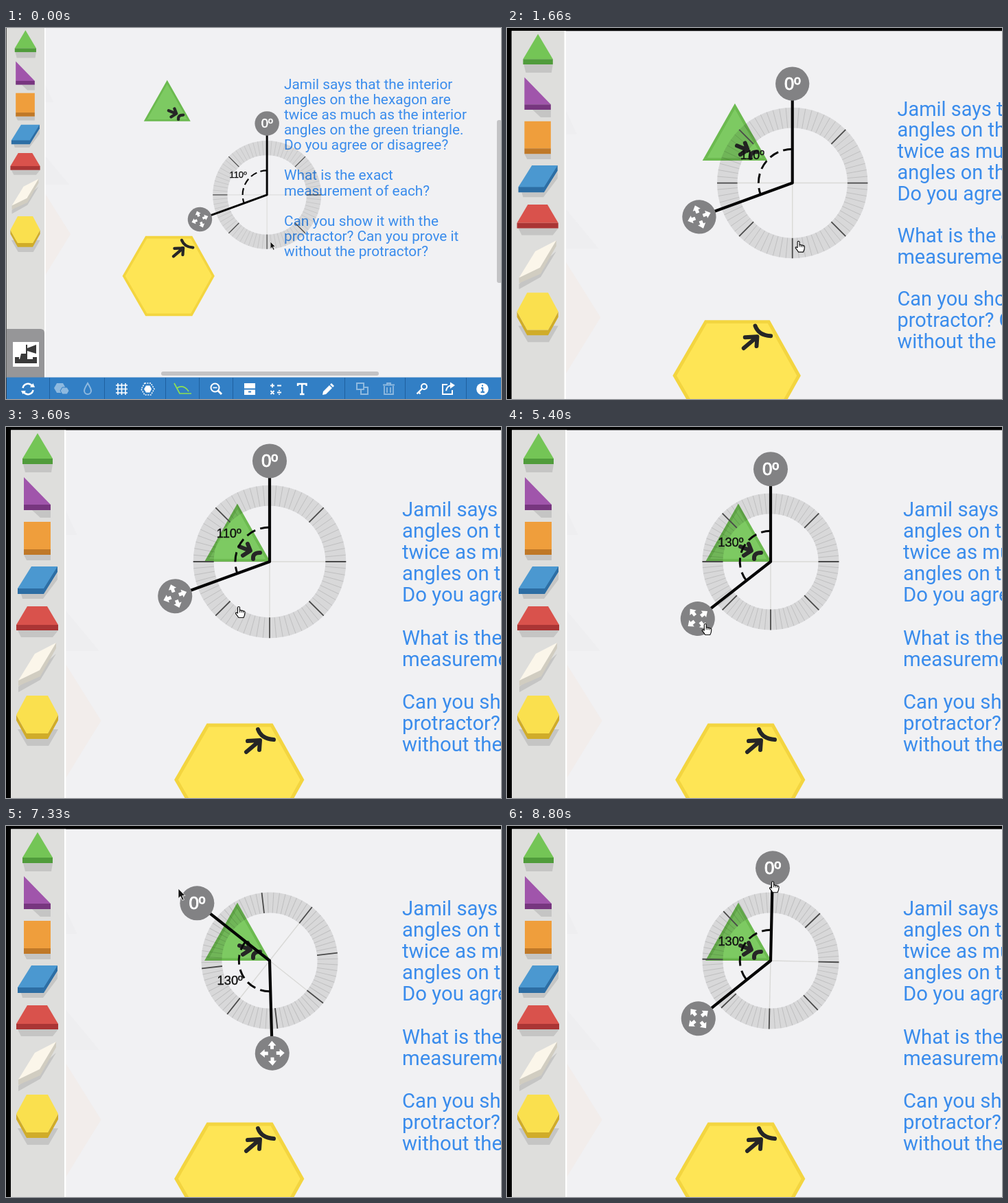
An HTML page that plays this animation: 721x540 px, repeating every 9200 ms.

```html
<!DOCTYPE html>
<html lang="en">
<head>
<meta charset="utf-8">
<title>Protractor on pattern shapes</title>
<style>
  html, body { margin: 0; width: 100%; height: 100%; overflow: hidden; background: #000; }
  svg { display: block; width: 721px; height: 540px; }
  .question { font: 400 20.8px Roboto, sans-serif; fill: #3a8cec; }
  .num { font-family: "Liberation Sans", Arial, sans-serif; text-anchor: middle; }
  .ink { fill: none; stroke: #262626; stroke-width: 6; stroke-linecap: round; stroke-linejoin: round; }
  .icon { fill: none; stroke: #fff; stroke-width: 2; }
  .solid { fill: #fff; stroke: none; }
  .dim { opacity: .45; }
  .shade { fill: #c5c5c4; }
</style>
</head>
<body>
<svg viewBox="0 0 721 540">
  <defs>
    <path id="moveArrow" d="M0 -18L6 -11H2.5V-6H-2.5V-11H-6Z"/>
  </defs>
  <g id="view">
    <rect x=".8" width="760" height="540" fill="#f1f1f3"/>

    <!-- faint ghosts beside the palette -->
    <path d="M57 241L94 300L57 360Z" fill="#f2edeb"/>
    <path d="M57 82L69 108H57ZM57 186L92 228H57Z" fill="#eeeef0"/>

    <g class="board">
      <path d="M294 434H387L431.500 513.500L387 593H294L248 513.500Z" fill="#fee555" stroke="#f3d540" stroke-width="5"/>
      <path d="M337 115.500L381.500 194H292.500Z" fill="#7dca62" stroke="#6cba50" stroke-width="4"/>
      <path class="ink" d="M340 174L355 180M352 170L356 180L345 187M360 192Q359 183 370 183"/>
      <path class="ink" d="M350 473L369 457M352 457L370 456L369 470M367 440Q372 454 390 455"/>
    </g>

    <g class="question" id="question"></g>

    <rect x="226" y="500" width="317" height="6" rx="3" fill="#c3c3c5"/>
    <rect x="715" y="134" width="7" height="237" rx="3" fill="#c3c3c5"/>

    <!-- palette -->
    <rect x=".8" width="55.500" height="509" fill="#dededc"/>
    <rect x="56" width="1.700" height="509" fill="#fff"/>
    <g class="board">
      <g class="shade">
        <path d="M25 54H68L66 66H28ZM38 121H65V132H50ZM26 186H65V194H30ZM22 243H55L75 212V222L54 250H24ZM17 296H76L68 306H22ZM73 330L50 368L18 386V378ZM17 440H76L62 464H31Z"/>
      </g>
      <path d="M46 9L68 46H24Z" fill="#74c556"/><path d="M24 46H68V54H24Z" fill="#509c3b"/>
      <path d="M26 73L65 113H26Z" fill="#a055ab"/><path d="M26 113H65V121H26Z" fill="#77367f"/>
      <path d="M26 138H65V178H26Z" fill="#ef9e3c"/><path d="M26 178H65V186H26Z" fill="#bf7828"/>
      <path d="M75 203V211L55 243H17V235Z" fill="#2d6ea4"/><path d="M37 203H75L55 235H17Z" fill="#4b98d0"/>
      <path d="M31 261H60L76 288H15Z" fill="#d9524c"/><path d="M15 288H76V296H15Z" fill="#aa3535"/>
      <path d="M73 314V322L50 363L18 377V369Z" fill="#d1cdc1"/><path d="M73 314L42 330L18 369L49 354Z" fill="#fbf6ea"/>
      <path d="M15 419L30 446H61L76 419V427L61 454H30L15 427Z" fill="#d0ac29"/>
      <path d="M30 391H61L76 419L61 446H30L15 419Z" fill="#fae04e"/>
    </g>
    <path d="M.8 438H50Q56 438 56 444V509H.8Z" fill="#969698"/>
    <rect x="10" y="457" width="38" height="36" fill="#fff"/>
    <path d="M13 479H19V482H39V479H45V488H13ZM29 461H31V482H29ZM31 466L44 461V474L31 470ZM22 474H29V482H20Z" fill="#3a3a3a"/>

    <!-- toolbar -->
    <rect x=".8" y="508.500" width="721" height="32" fill="#327fc5"/>
    <path d="M63.500 509V540M143.500 509V540M232.500 509V540M281.500 509V540M330.500 509V540M493.500 509V540M581.500 509V540M670.500 509V540" stroke="#1f609f"/>
    <g class="icon">
      <path d="M24.500 524A7.500 7.500 0 0 1 38 521M39.500 527A7.500 7.500 0 0 1 26 530" stroke-width="2.500"/>
      <path class="solid" d="M35 523H42L39.500 517ZM22 528H29L24.500 533Z"/>
      <g class="dim">
        <path class="solid" d="M74 517H83L87 524L83 531H74L70 524Z"/>
        <path d="M82 523H89L92 528L89 533H82L79 528Z" fill="#fff" stroke="#327fc5" stroke-width="1"/>
        <path d="M119 517Q124 525 124 528A5 5 0 0 1 114 528Q114 525 119 517Z"/>
        <path d="M511 517H521V526H511ZM517 526V533H527V523H521"/>
        <path d="M551 521V533H564V521M549 519.500H566M555 519V517H560V519M555 523V531M560 523V531" stroke-width="1.800"/>
      </g>
      <path d="M163 517V534M168.500 517V534M174 517V534M160 520H177M160 525.500H177M160 531H177" stroke-width="1.600"/>
      <path d="M202 517H211L216 525.500L211 534H202L197 525.500Z" stroke-width="1.500" stroke-dasharray="2 1.500"/>
      <path class="solid" d="M204 520.500H209.500L212 525.500L209.500 530.500H204L201 525.500Z"/>
      <path d="M245 517L253 532H270M249 524Q259 518 266 529" stroke="#8fe052" stroke-width="1.700"/>
      <circle cx="304.500" cy="523.500" r="6"/><path d="M309 528L314 533" stroke-width="3"/><path d="M301.500 523.500H307.500" stroke-width="1.600"/>
      <path class="solid" d="M347 517H363V534H347Z"/><path d="M347 525.500H363M353 529.500H357" stroke="#327fc5" stroke-width="1.800"/>
      <path d="M385 520.500H391M388 517.500V523.500M395 520.500H401M385.500 528L390.500 533M390.500 528L385.500 533M395 530.500H401M398 527V528.500M398 532.500V534" stroke-width="1.800"/>
      <path d="M425 521V518H437.500V521M431.200 518V533M428 533H434.500" stroke-width="2.400"/>
      <path class="solid" d="M461 534L462 529L471 520L475 524L466 533ZM472 519L474 517L478 521L476 523Z"/>
      <circle cx="609" cy="522" r="4"/><path d="M606 525L598.500 532.500M601 530L603.500 532.500" stroke-width="2.400"/>
      <path d="M643 519H636V533H650V527"/><path d="M641 528Q642 521 649 520"/><path class="solid" d="M647 515.500L654 520L647 525Z"/>
      <circle class="solid" cx="694" cy="525.500" r="8.800"/>
      <path d="M694 519.500V521.500M692 524H694.300V530M691.500 530H697" stroke="#327fc5"/>
    </g>

    <g class="board">
      <g id="dial">
        <circle id="ring" fill="none" stroke="#000" stroke-opacity=".105" stroke-width="30"/>
        <path id="fine" stroke="#000" stroke-opacity=".12"/>
        <path id="cross" stroke="#4c4c30" stroke-opacity=".14" stroke-width="1.400"/>
        <path id="major" stroke="#4a4a4a" stroke-width="1.800"/>
        <path id="arc" fill="none" stroke="#0a0a0a" stroke-width="3" stroke-dasharray="14 7.500"/>
        <path id="arms" fill="none" stroke="#050505" stroke-width="4.200" stroke-linejoin="round"/>
      </g>
      <text id="label" class="num" font-size="18.300" fill="#111" stroke="#111" stroke-width=".4"></text>
      <g id="zero">
        <circle r="25" fill="#828284"/>
        <text class="num" y="9" font-size="26" fill="#fff" stroke="#fff" stroke-width=".9">0º</text>
      </g>
      <g id="grip" fill="#fff">
        <circle r="25" fill="#828284"/>
        <use href="#moveArrow"/>
        <use href="#moveArrow" transform="rotate(90)"/>
        <use href="#moveArrow" transform="rotate(180)"/>
        <use href="#moveArrow" transform="rotate(270)"/>
      </g>
      <path id="arrow" d="M0 0V14.500L3.300 11.500L6 17.300L8.400 16.200L5.800 10.600L10 10.300Z" fill="#111" stroke="#fff" stroke-width=".9"/>
      <g id="hand" stroke="#111" stroke-width="1.200" stroke-linejoin="round">
        <path d="M-1.500 9V1Q-1.500 -.5 0 -.5T1.500 1V5Q3 4 4 5.500Q5.500 4.700 6.500 6Q9 5.500 9 8Q9 12 7 15.500H0Q-2 12.500 -4.500 9.500Q-4.500 7 -1.500 9Z" fill="#fff"/>
        <path d="M1.500 5V8M4 5.500V8.300M6.500 6V8.500" fill="none" stroke-width=".9"/>
      </g>
    </g>
  </g>
</svg>
<script>
const LOOP = 9200, STEP = 1000 / 15, ZOOM = 1.41;
const $ = id => document.getElementById(id);
const set = (id, name, value) => $(id).setAttribute(name, value);
const place = (id, [x, y], turn = 0) => set(id, 'transform', `translate(${x} ${y}) rotate(${turn})`);

// The board is laid out at full zoom.
document.querySelectorAll('.board').forEach(g =>
  g.setAttribute('transform', `scale(${1 / ZOOM}) translate(-6 -4.5)`));

const lines = ['Jamil says that the interior', 'angles on the hexagon are', 'twice as much as the interior',
  'angles on the green triangle.', 'Do you agree or disagree?', '', 'What is the exact',
  'measurement of each?', '', 'Can you show it with the', 'protractor? Can you prove it', 'without the protractor?'];
$('question').innerHTML = lines.map((s, i) => `<text x="405" y="${88.8 + i * 22.1}">${s}</text>`).join('');

// Rows are [time, ...values], joined by straight segments.
const centre = [[1000, 542, 347], [1333, 471.3, 290.3], [1600, 428, 236], [1933, 398, 201], [2133, 386, 190],
  [2200, 382, 187], [2400, 382, 187], [2600, 381, 190], [2866, 381, 190], [3000, 381, 193],
  [3133, 381, 193], [3333, 384, 196]];
const opening = [[4600, 110, 111.3], [4933, 165, 100], [5066, 180, 99.5], [5200, 162, 99], [5400, 128, 99.5],
  [5533, 112, 107], [5733, 130, 106], [6000, 180, 104], [6133, 180, 104], [6400, 145, 101], [6600, 130, 99.5]];
const toGrip = [[3466, 393, 282], [3533, 368, 274], [3600, 339, 262], [3733, 290, 252], [4000, 259, 249],
  [4266, 259, 249], [4466, 257, 254]];
const toZero = [[6600, 292, 291], [7066, 384, 81], [7333, 251, 91], [7400, 238, 95], [7600, 262, 114], [7800, 278, 132]];

function sample(rows, t) {
  if (t <= rows[0][0]) return rows[0].slice(1);
  const i = rows.findIndex(r => r[0] > t);
  if (i < 0) return rows[rows.length - 1].slice(1);
  const a = rows[i - 1], b = rows[i], u = (t - a[0]) / (b[0] - a[0]);
  return a.slice(1).map((v, j) => v + (b[j + 1] - v) * u);
}
const ramp = (t, a, b) => Math.min(1, Math.max(0, (t - a) / (b - a)));
const smooth = u => u * u * (3 - 2 * u);

// Degrees run anticlockwise from the top.
function polar(r, deg) {
  const a = deg * Math.PI / 180;
  return [-r * Math.sin(a), -r * Math.cos(a)];
}
const add = (p, q) => [p[0] + q[0], p[1] + q[1]];
const spoke = (r1, r2, deg) => `M${polar(r1, deg)}L${polar(r2, deg)}`;
function spokes(r1, r2, step, skip) {
  let d = '';
  for (let a = 0; a < 360; a += step) if (!skip || a % skip) d += spoke(r1, r2, a);
  return d;
}

function pointer(t, mid, grip, zero) {
  if (t < 200) return add([549, 443], [0, -8 * ramp(t, 0, 200)]);
  if (t < 3466) return add(mid, [9, 86.5]);
  if (t < 4466) return sample(toGrip, t);
  if (t < 6600) return add(grip, [11, 8]);
  if (t < 7800) return sample(toZero, t);
  return add(zero, [0, 20]);
}

function draw(t) {
  const z = 1 + (ZOOM - 1) * (1 - Math.pow(1 - ramp(t, 1000, 1933), 2.4));
  set('view', 'transform', `translate(${14.6 * (z - 1)} ${11 * (z - 1)}) scale(${z})`);

  const mid = sample(centre, t), [angle, r] = sample(opening, t);
  const turn = 51.6 * ramp(t, 7066, 7320) - 52.9 * smooth(ramp(t, 7933, 8800));
  const reach = r + 35.3, bend = r * .45;
  place('dial', mid, -turn);
  set('ring', 'r', r - 15);
  set('fine', 'd', spokes(r - 30, r, 5, 45));
  set('major', 'd', spokes(r - 30, r, 45));
  set('cross', 'd', spokes(0, r - 30, 90));
  set('arc', 'd', `M0 ${-bend}A${bend} ${bend} 0 ${angle > 180 ? 1 : 0} 0 ${polar(bend, angle)}`);
  set('arms', 'd', `M0 ${-reach}L0 0L${polar(reach, angle)}`);

  const zero = add(mid, polar(reach, turn)), grip = add(mid, polar(reach, turn + angle));
  place('zero', zero);
  place('grip', grip, -turn - angle);
  place('label', add(add(mid, polar(r * .65, turn + angle / 2)), [0, 6.5]));
  $('label').textContent = Math.round(angle / 5) * 5 + 'º';

  const tip = pointer(t, mid, grip, zero);
  const pointing = t < 130 || (t > 7300 && t < 7700);
  place('arrow', tip);
  place('hand', tip);
  set('arrow', 'visibility', pointing ? 'visible' : 'hidden');
  set('hand', 'visibility', pointing ? 'hidden' : 'visible');
}

const start = performance.now();
function tick() {
  const t = (performance.now() - start) % LOOP;
  draw(Math.min(8800, Math.floor(t / STEP + .12) * STEP));
  requestAnimationFrame(tick);
}
tick();
</script>
</body>
</html>
```
